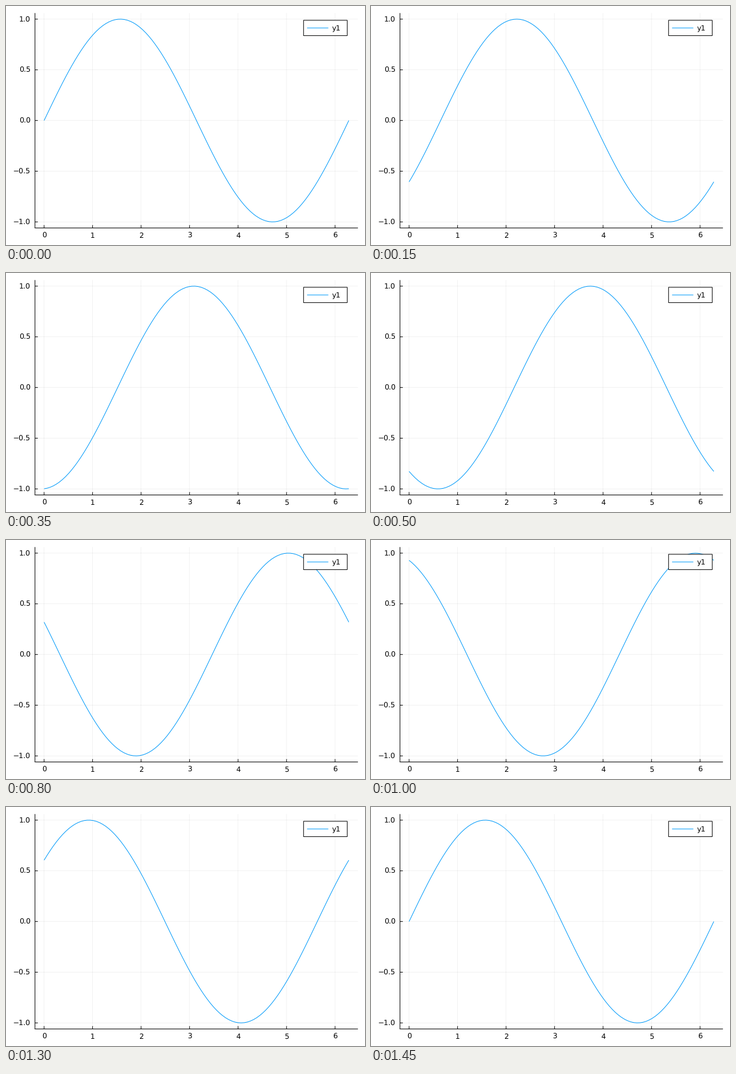
A matplotlib script that plays this animation: 600 by 400 pixels, repeating every 1500 ms.

```python
import numpy as np
import matplotlib.pyplot as plt
from matplotlib.animation import FuncAnimation
from matplotlib.patches import Rectangle

W, H, DPI = 600, 400, 100
FRAMES, INTERVAL = 30, 50
PX = 72 / DPI  # points per pixel
LEFT, RIGHT, TOP, BOTTOM = 48.4, 588.2, 11.8, 371.5
BLUE = "#009AFA"
TICK = 4.8

plt.rcParams["font.family"] = "DejaVu Sans"
plt.rcParams["path.snap"] = False
plt.rcParams["text.hinting"] = "none"

fig = plt.figure(figsize=(W / DPI, H / DPI), dpi=DPI, facecolor="white")
ax = fig.add_axes([0, 0, 1, 1])
ax.set_xlim(0, W)
ax.set_ylim(H, 0)
ax.axis("off")


def to_x(v):
    pad = 0.06 * np.pi
    return LEFT + (v + pad) / (2 * np.pi + 2 * pad) * (RIGHT - LEFT)


def to_y(v):
    return BOTTOM - (v + 1.06) / 2.12 * (BOTTOM - TOP)


def line(xs, ys, color="black", width=1.0, **kw):
    return ax.plot(xs, ys, color=color, lw=width * PX,
                   solid_capstyle="butt", **kw)[0]


def label(x, y, text, ha):
    ax.text(x, y, text, fontsize=12 * PX, ha=ha, va="baseline", zorder=6)


for v in range(7):
    x = to_x(v)
    line([x, x], [TOP, BOTTOM], width=0.5, alpha=0.1)
    line([x, x], [BOTTOM, BOTTOM - TICK])
    label(x, 387.5, str(v), "center")

for v in np.linspace(-1, 1, 5):
    y = to_y(v)
    line([LEFT, RIGHT], [y, y], width=0.5, alpha=0.1)
    line([LEFT, LEFT + TICK], [y, y])
    label(41, y + 4.4, f"{v:.1f}".replace("-", "\u2212"), "right")

line([LEFT, LEFT], [TOP, BOTTOM + 0.5])
line([LEFT - 0.5, RIGHT], [BOTTOM, BOTTOM])

t = np.linspace(0, 2 * np.pi, 100)
curve = line(to_x(t), to_y(np.sin(t)), BLUE, zorder=3)

# legend
ax.add_patch(Rectangle((497.3, 23.9), 73, 25.7, facecolor="white",
                       edgecolor="black", lw=PX, zorder=4))
line([503.2, 538.7], [36.8, 36.8], BLUE, zorder=5)
label(544.6, 41.2, "y1", "left")


def update(i):
    phase = 2 * np.pi * i / (FRAMES - 1)
    curve.set_ydata(to_y(np.sin(t - phase)))
    return [curve]


anim = FuncAnimation(fig, update, frames=FRAMES, interval=INTERVAL,
                     repeat=True, repeat_delay=0)
plt.show()
```
